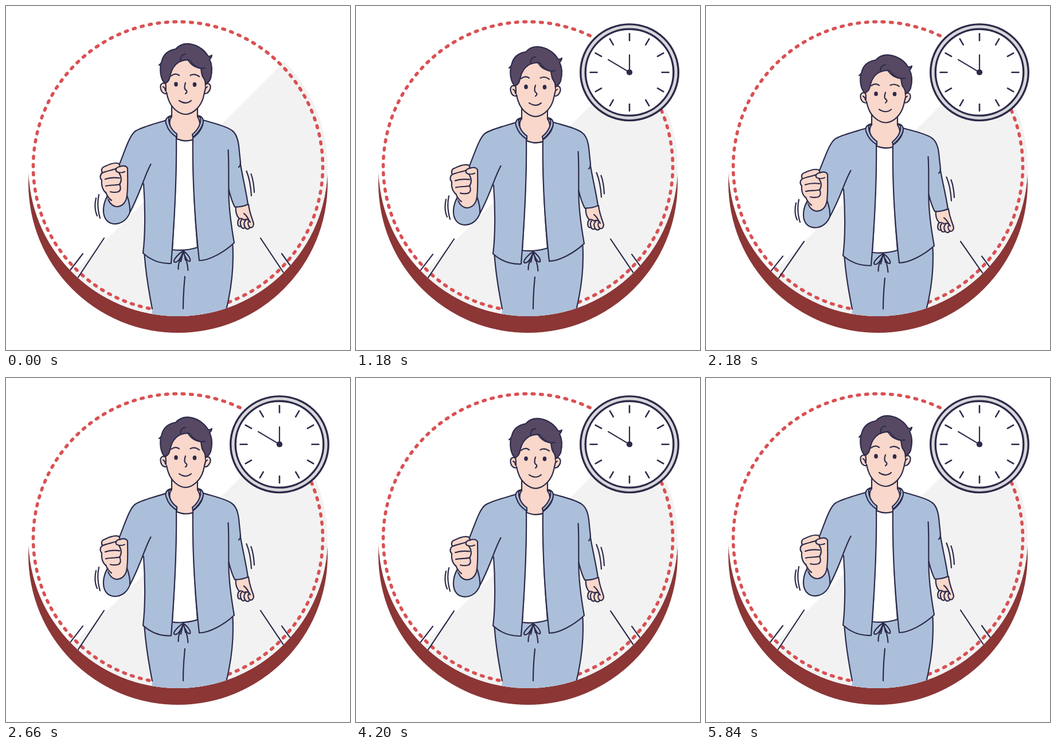
An HTML page for the animation above (6 s loop, 600 by 600 pixels).

```html
<!DOCTYPE html>
<html lang="en">
<head>
<meta charset="utf-8">
<title>Walking time</title>
<style>
html, body { margin: 0; height: 100%; overflow: hidden; background: #fff; }
svg { display: block; width: 100vw; height: 100vh; }
.ink { stroke: #2d2b4a; stroke-width: 2.2; stroke-linecap: round; stroke-linejoin: round; fill: none; }
.blue { fill: #abbfda; }
.skin { fill: #f9d7ca; }
.hair { fill: #574864; }
.white { fill: #fff; }
.dark { fill: #2d2b4a; stroke: none; }
.bare { stroke: none; }
</style>
</head>
<body>
<svg viewBox="0 0 600 600">
  <clipPath id="disc"><circle cx="300" cy="280" r="261"/></clipPath>

  <!-- badge -->
  <circle cx="300" cy="309" r="261" fill="#8c3636"/>
  <circle cx="300" cy="280" r="261" fill="#fff"/>
  <path d="M582.500 0H600V600H-17.500Z" fill="#f2f2f2" clip-path="url(#disc)"/>
  <circle cx="300" cy="280" r="252.500" fill="none" stroke="#d95153" stroke-width="5.600" stroke-linecap="round"
    pathLength="1100" stroke-dasharray="2.500 7.500"/>

  <g clip-path="url(#disc)">
  <g id="walker" class="ink">
    <path d="M134 432L108 466M171 405L120 482M444 405L490 474M481 432L501 460"/>
    <path d="M162 329C159 342 160 356 164 370M157 335C154.500 346 155 357 159 366M419.500 288C424 299 427 315 428 331M427.500 293C431 303 432.500 314 433 325"/>

    <!-- trousers -->
    <path class="blue bare" d="M241 430C244 470 250 500 255 530L253 550H381L385 528C393 495 398 455 395.500 413L336 419L290 424Z"/>
    <path d="M241.500 434C244 468 249.500 500 255 528M395.500 417C397.500 456 393 493 384.500 528M312 472C310 492 309 510 309 528"/>

    <!-- shirt and neck -->
    <path class="white" d="M297 231Q312 238 326 233C326 300 329 360 334 421Q312 428 290 425C294 360 297 300 297 231Z"/>
    <path class="skin" d="M289 174V193C281 202 288 220 297 231Q312 238 326 233C336 224 343 206 334 193V174Z"/>

    <!-- drawstring -->
    <path d="M309 427C300 433 292 442 293 446C298 450 306 439 309 428C312 438 317 447 321 445C323 440 315 431 309 427M309 429C304 439 300 449 300.500 459M309 429C314 440 317 451 317.500 461M309 428L305 446M310 429L313 443"/>

    <!-- far hand -->
    <path class="skin" d="M401 349C400 358 402 366 407 371C404 373 403 381 406 384C408 385 409 385 410 384C411 388 415 389 417 386C419 390 424 390 425 386C429 388 432 384 432 380C430 371 425 363 423 346Z"/>
    <path d="M407 371C410 370 413 371 415 373C420 371 424 373 426 377M410 384C408 379 409 375 411 373M417 386C414 381 415 376 418 374M425 386C421 381 422 377 424 375M415 362C418 364 421 368 424 374"/>

    <!-- jacket, right side of the picture -->
    <path class="blue" d="M344 199C360 204 384 209 394 217C404 224 406 240 407 254C408 264 409 270 409 276C413 300 419 324 422 346Q411 351 399 350.500C394 341 391 330 388.500 320C388 350 394 390 398 413C380 430 354 444 337 444C330 380 325 300 326 230C338 221 344 210 344 199Z"/>
    <path d="M387.500 251C389 275 388 300 388.500 322M409 273Q409 279 406 281"/>
    <path class="blue" d="M334 191C344 192 346 200 342 209C338 218 332 224 326 229L325 224C335 216 341 204 339 195Z"/>

    <!-- jacket, left side of the picture -->
    <path class="blue bare" d="M280 199C258 206 237 211 226 218C215 225 206 256 197 277L190 350L216 360C225 343 232 325 240 308C243 350 243 400 239 431C250 441 265 450 288 449C293 385 298 300 297 228Z"/>
    <path d="M197 278C206 257 215 225 226 218C237 211 258 206 280 199M252.500 276C245 290 239 308 235 318C229 333 223 347 216 360M240 310C243 350 243 400 239 431C250 441 265 450 288 449C293 385 298 300 297 228"/>
    <path class="blue" d="M289 191C280 193 276 199 280 207C283 217 290 224 298 229V223C288 216 283 205 284 195Z"/>
    <path class="blue" d="M177 331C169 345 168 361 173 370C181 386 208 383 216 360C217 351 215 342 211 330Z"/>

    <!-- near fist -->
    <path class="skin" d="M178 328C169 324 166 314 167 304C163 300 164 294 168 291C165 285 168 281 172 280C180 276 190 272 197 275L199 280C205 278 210 279 212 283C212 300 213 315 211 330C210 342 203 350 193 350C184 349 178 341 176.500 330Z"/>
    <path class="skin bare" d="M174 324L180 322L184 338L178 337Z"/>
    <path d="M168 291C178 287 188 286 193 283M199 280C192 281 190 286 193 289C197 291 203 291 207 289M173 302C181 299 190 299 198 300M174 314C182 312 190 313 199 311M197 291C202 298 202 306 198 311C201 317 200 322 196 324Q189 326 182 324M174 325Q178 335 184 339"/>

    <!-- head -->
    <path class="skin" d="M281 137C272 131 268 137 270 145C272 152 277 154 281 152ZM347 137C354 132 358 138 356 145C353 152 349 154 345 152Z"/>
    <path class="skin" d="M278 130C279 142 279 152 283 162C288 178 302 189 314 189C328 188 340 174 344 160C347 150 348 140 348 128L340 92H286Z"/>
    <path class="skin bare" d="M280 138h5v12h-5ZM343 138h4v10h-4Z"/>
    <path class="hair" d="M277 135C270 128 268 114 270 101L267 103Q271 101 272 95C275 84 284 77 296 75C303 67 313 64 325 67C337 70 347 78 352 87Q355 89 359 86Q358 91 355 93C360 103 360 114 357 126Q354 134 348 136C348 130 346 127 343 123C341 119 341 114 340 109C332 107 325 102 321 95C315 93 307 95 301 98C295 102 289 110 287 119C285 126 285 132 277 135Z"/>
    <path d="M305 96C303 90 307 84 313 84M317 93C322 103 334 111 347 108M274 141Q278 143 278 148M351 141Q347 143 347 148"/>
    <path d="M288 122Q295 116 302 121M321.500 121Q329 117 337 123M313 134C311 140 311 144 313 146Q318 149 313 153M302 165Q314 173 323 165"/>
    <ellipse class="dark" cx="296.500" cy="136.500" rx="3.300" ry="4"/>
    <ellipse class="dark" cx="329" cy="137" rx="3.300" ry="4"/>
  </g>
  </g>

  <g id="clock" class="ink" transform="translate(477 115.700) scale(1 .983)">
    <circle r="85.300" fill="#d8d8dc" stroke-width="3.400"/>
    <circle r="76.800" class="white" stroke-width="3.400"/>
    <g id="ticks" stroke-width="2.600"></g>
    <path d="M0 -31V0L-37 -22.500"/>
    <circle class="dark" r="5.200"/>
  </g>
</svg>
<script>
const get = id => document.getElementById(id);
const walker = get('walker'), clock = get('clock');
const FLOOR = 540, SQUASH = 0.0468, RESTART = 3010, LOOP = 6000;
// Times at which the walker is alternately upright and lowest.
const TURNS = [0, 704, 1400, 2000, 2840];

for (let a = 0; a < 360; a += 30)
  get('ticks').innerHTML += `<path d="M0 -68.500V-56.500" transform="rotate(${a})"/>`;

const clamp = x => Math.min(1, Math.max(0, x));
const smooth = x => x * x * (3 - 2 * x);

function dip(t) {
  const i = TURNS.findIndex(end => t < end);
  if (i < 1) return 0;
  const p = smooth((t - TURNS[i - 1]) / (TURNS[i] - TURNS[i - 1]));
  return i % 2 ? p : 1 - p;
}

function draw() {
  const now = performance.now() % LOOP;
  const t = now < RESTART ? now : now - RESTART;
  const s = 1 - SQUASH * dip(t);
  walker.setAttribute('transform', `matrix(1 0 0 ${s} 0 ${FLOOR * (1 - s)})`);
  clock.setAttribute('opacity', smooth(clamp(t / 500)));
  requestAnimationFrame(draw);
}
draw();
</script>
</body>
</html>
```
